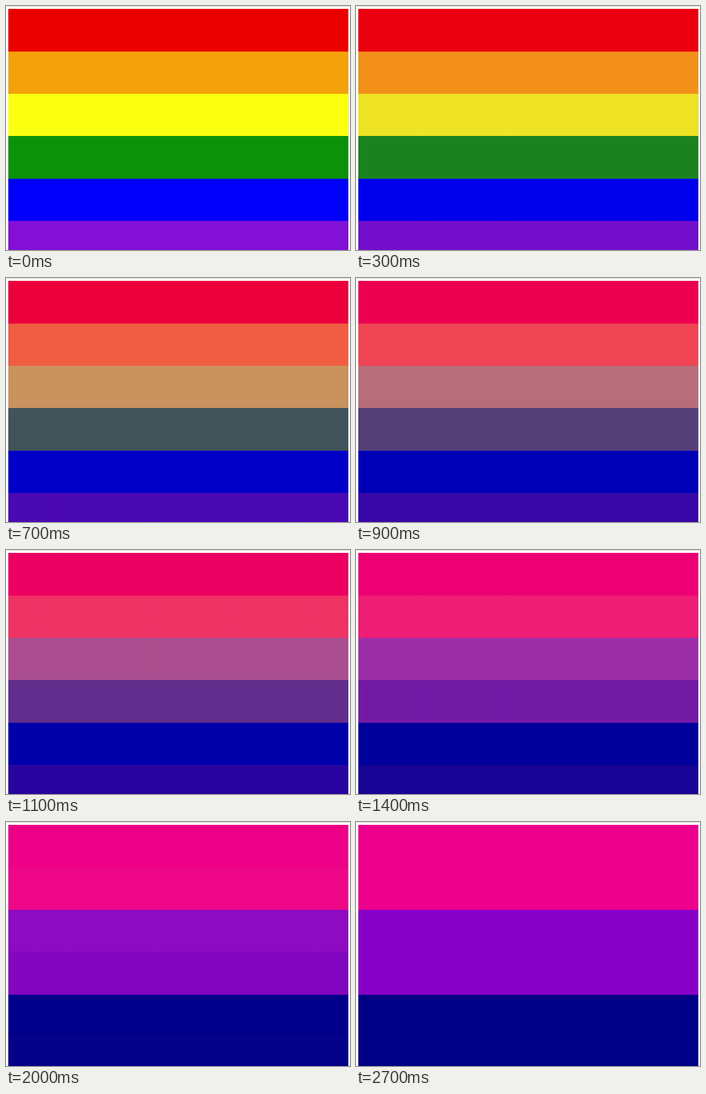
These frames come from a looping animation (600x428 px, 2800 ms). An HTML page:

```html
<!DOCTYPE html>
<html lang="en">
<head>
<meta charset="utf-8">
<title>Stripes</title>
<style>
  html, body { margin: 0; width: 100%; height: 100%; overflow: hidden; background: #fff; }
  .stage { position: relative; width: 600px; height: 428px; overflow: hidden; }
  .stage::before { content: ""; position: absolute; inset: 0 0 auto; height: 1px; background: #dcdcdc; }
  .flag {
    position: absolute; left: 4px; top: 5px; width: 593px; height: 423px;
    background: linear-gradient(
      var(--a) 75px, var(--b) 0 149px, var(--c) 0 223px,
      var(--d) 0 298px, var(--e) 0 372px, var(--f) 0);
  }
  .start {
    --a: rgb(235 0 0); --b: rgb(244 162 10); --c: rgb(251 255 16);
    --d: rgb(12 146 8); --e: rgb(0 0 250); --f: rgb(130 16 214);
    border-right: 1px solid #e2e2e2;
  }
  .end {
    --a: rgb(237 0 140); --b: var(--a); --c: rgb(136 0 200);
    --d: var(--c); --e: rgb(0 0 134); --f: var(--e);
    opacity: 0;
  }
</style>
</head>
<body>
<div class="stage">
  <div class="flag start"></div>
  <div class="flag end"></div>
</div>
<script>
  const LOOP = 2800, STEP = 100;
  const end = document.querySelector('.end');

  const bezier = (s, p1, p2) =>
    3 * s * (1 - s) ** 2 * p1 + 3 * s * s * (1 - s) * p2 + s ** 3;

  // Same curve as the CSS "ease" keyword
  function ease(x) {
    if (x <= 0 || x >= 1) return x <= 0 ? 0 : 1;
    let lo = 0, hi = 1;
    for (let i = 0; i < 24; i++) {
      const mid = (lo + hi) / 2;
      if (bezier(mid, 0.25, 0.25) < x) lo = mid; else hi = mid;
    }
    return bezier(lo, 0.1, 1);
  }

  // The fade advances in held steps, then jumps back to the first flag
  const t0 = performance.now();
  function draw() {
    const t = (performance.now() - t0) % LOOP;
    end.style.opacity = ease(Math.floor(t / STEP) * STEP / (LOOP - STEP));
    requestAnimationFrame(draw);
  }
  draw();
</script>
</body>
</html>
```
